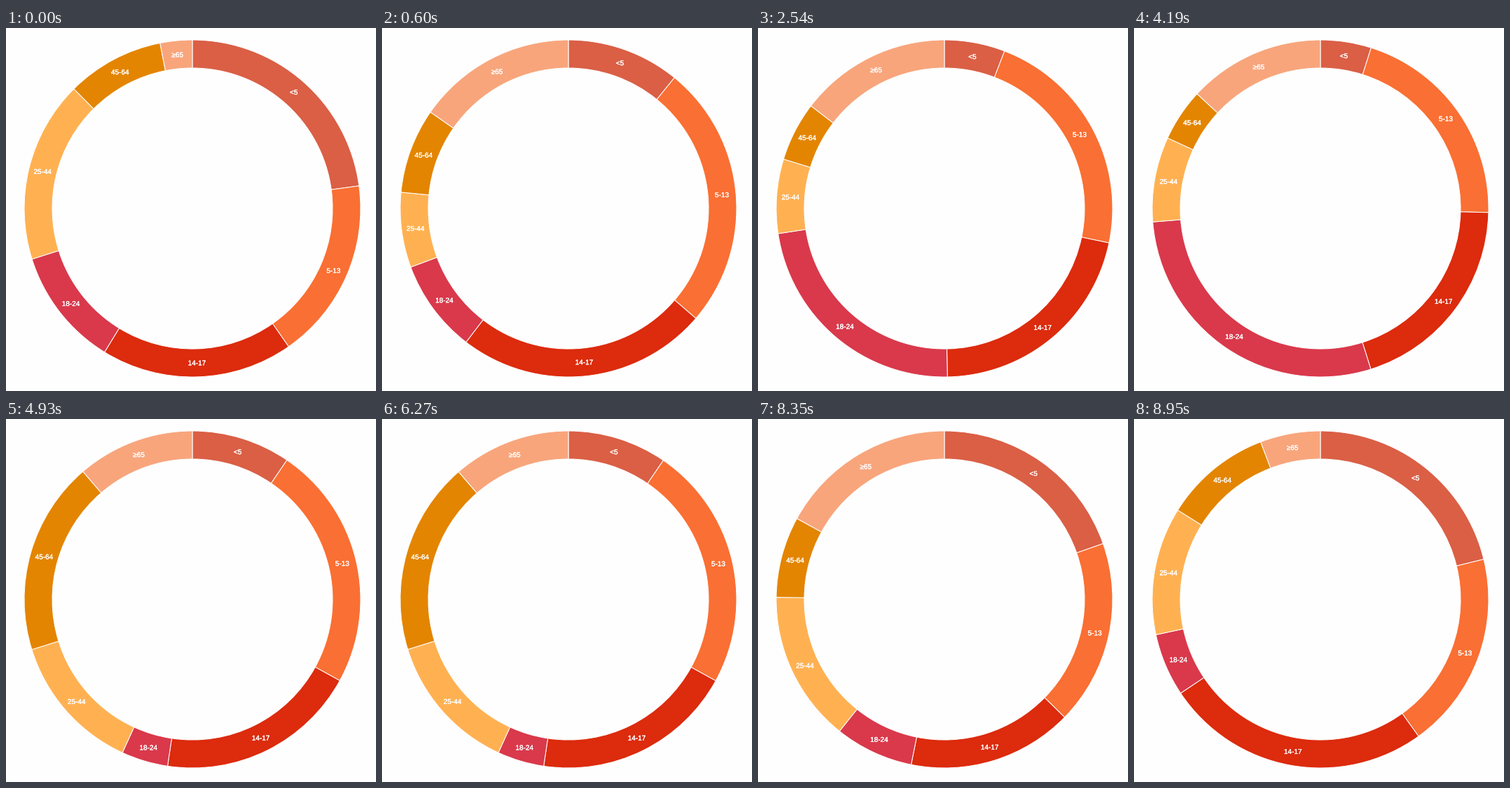
These frames come from a looping animation (528x517 px, 9.25 s). A matplotlib script:

```python
import math

import matplotlib.pyplot as plt
import numpy as np
from matplotlib.animation import FuncAnimation
from matplotlib.patches import Wedge
from matplotlib.patheffects import Normal, Stroke

W, H, DPI = 528, 517, 64
PX = 72 / DPI  # points per pixel
LOOP, TICK = 9250, 25
STEP = LOOP / 62  # the picture is refreshed at this pace, ms
START, PERIOD, TWEEN = 29, 1998, 880  # rhythm of the transitions, ms
CX, CY, R_OUT, R_IN = 266, 257, 240, 200

GROUPS = {
    "<5": "#da5f45",
    "5-13": "#fa6f33",
    "14-17": "#dc2b0d",
    "18-24": "#d9394b",
    "25-44": "#ffb152",
    "45-64": "#e38500",
    "≥65": "#f8a57c",
}

# The data: where each slice meets the next, degrees clockwise from the top.
STATES = np.array([
    [82.3, 145.1, 211.5, 252.5, 315.2, 348.9],
    [29.7, 127.6, 218.8, 249.0, 266.9, 295.3],
    [17.2, 90.8, 162.0, 266.7, 295.6, 312.7],
    [34.2, 118.8, 188.5, 204.6, 252.7, 319.4],
    [69.1, 131.6, 178.9, 207.6, 262.0, 287.4],
    [76.2, 144.3, 236.2, 257.9, 302.0, 339.2],
])


def ease(t):
    t = min(max(t, 0), 1)
    return 4 * t**3 if t < 0.5 else 1 - 4 * (1 - t)**3


def bounds(ms):
    k, since = divmod(max(ms - START, 0), PERIOD)
    a, b = STATES[int(k)], STATES[int(k) + 1]
    return [0, *(a + (b - a) * ease(since / TWEEN)), 360]


fig = plt.figure(figsize=(W / DPI, H / DPI), dpi=DPI, facecolor="#fefefe")
ax = fig.add_axes([0, 0, 1, 1])
ax.set(xlim=(0, W), ylim=(H, 0))
ax.axis("off")

# A hairline outline gives the small labels smooth, slightly fuller letters.
fuller = [Stroke(linewidth=0.25 * PX, foreground="white"), Normal()]
slices, labels = [], []
for name, color in GROUPS.items():
    arc = Wedge((CX, CY), R_OUT, 0, 1, width=R_OUT - R_IN, facecolor=color,
                edgecolor="white", linewidth=PX, snap=False)
    slices.append(ax.add_patch(arc))
    labels.append(ax.text(0, 0, name, color="white", ha="center",
                          va="baseline", family="Liberation Sans",
                          size=10 * PX, zorder=3, path_effects=fuller))


def draw(i):
    # A small lead keeps each refresh on its nearest tick.
    cuts = bounds((i * TICK + 14) // STEP * STEP)
    mid_r = (R_OUT + R_IN) / 2
    for arc, label, a, b in zip(slices, labels, cuts, cuts[1:]):
        arc.set_theta1(a - 90)
        arc.set_theta2(b - 90)
        mid = math.radians((a + b) / 2)
        label.set_position((CX + mid_r * math.sin(mid),
                            CY - mid_r * math.cos(mid) + 3.5))
    return slices + labels


anim = FuncAnimation(fig, draw, frames=LOOP // TICK, interval=TICK,
                     init_func=lambda: draw(0), repeat=True, repeat_delay=0)
plt.show()
```
